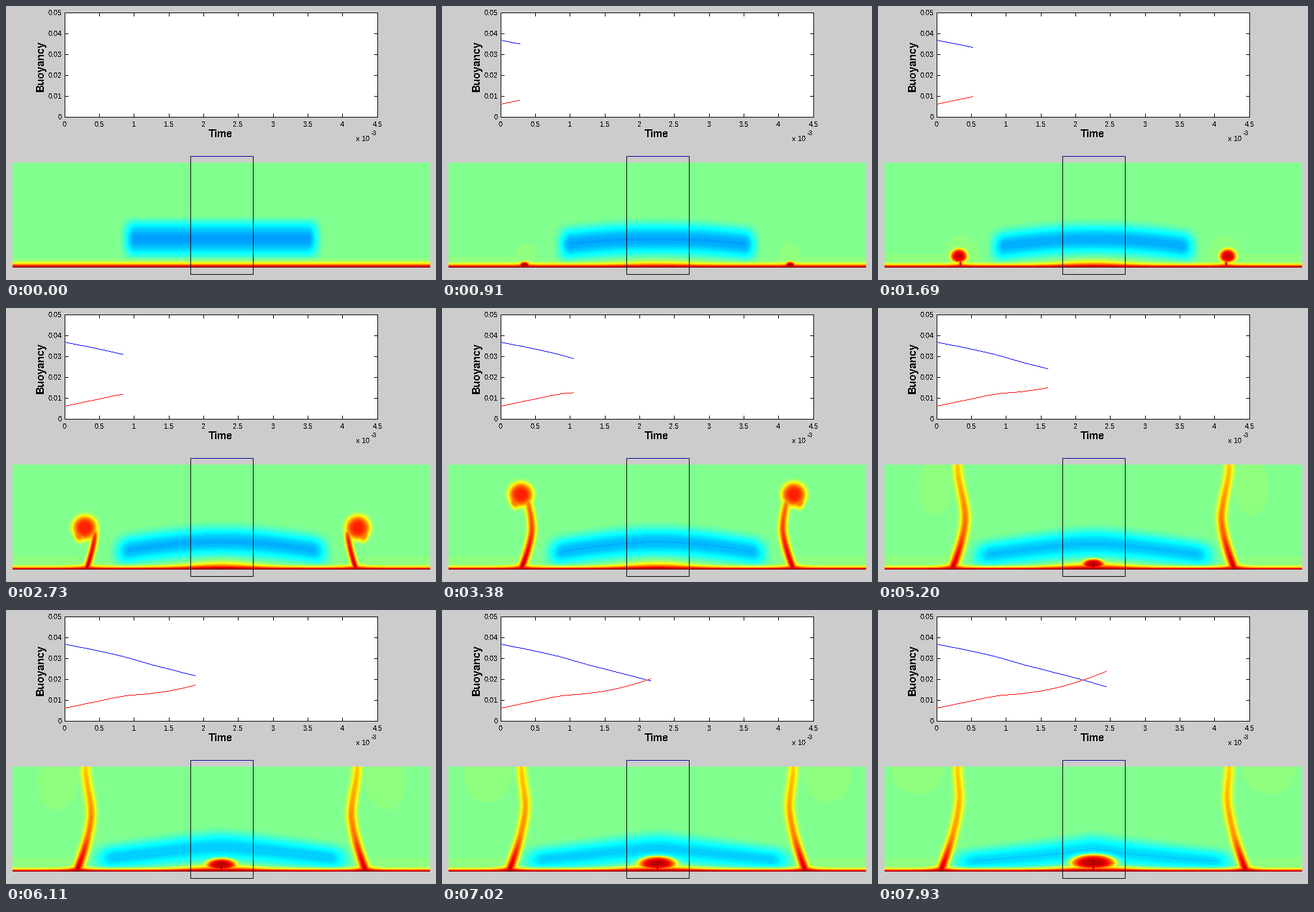
A matplotlib script for the animation above (8 s loop, 660 by 420 pixels).

```python
import numpy as np
import matplotlib.pyplot as plt
from matplotlib.animation import FuncAnimation
from matplotlib.patches import Rectangle

W, H, DPI = 660, 420, 100
INTERVAL, FRAMES, STEP_MS, STEPS = 40, 200, 130, 61
PX = 72 / DPI

plt.rcParams.update({
    "font.family": "Liberation Sans",
    "text.hinting": "native",
    "text.hinting_factor": 1,
})


# ---------------------------------------------------------------- helpers
def ramp(a, b, x):
    return np.clip((x - a) / (b - a), 0, 1)


def ease(a, b, x):
    t = ramp(a, b, x)
    return t * t * (3 - 2 * t)


def window(a, b, c, d, x):
    """Fade in from a to b and out from c to d."""
    return ramp(a, b, x) * (1 - ramp(c, d, x))


def bell(x, width):
    return np.exp(-(x / width) ** 2)


def curve(x, xs, ys):
    """Smooth cubic through a few points."""
    xs, ys = np.asarray(xs, float), np.asarray(ys, float)
    m = np.gradient(ys, xs)
    i = np.clip(np.searchsorted(xs, x, "right") - 1, 0, len(xs) - 2)
    h = xs[i + 1] - xs[i]
    t = (x - xs[i]) / h
    return ((1 + 2 * t) * (1 - t) ** 2 * ys[i] + t * (1 - t) ** 2 * h * m[i]
            + t * t * (3 - 2 * t) * ys[i + 1] + t * t * (t - 1) * h * m[i + 1])


# ---------------------------------------------------------------- field
# Left half of the tank only; the right half is its mirror image.
# Every part takes p, the progress of the run from 0 to 1.
X, Y = np.meshgrid(np.arange(10, 331) + 0.5, np.arange(240, 401) + 0.5)
S = 330.5 - X
D = 401 - Y

u = np.arange(1, 65) / 16
JET = np.stack([np.minimum(u - 1.5, 4.5 - u),
                np.minimum(u - 0.5, 3.5 - u),
                np.minimum(u + 0.5, 2.5625 - u)], axis=1)
JET = np.round(np.clip(JET, 0, 1) * 255).astype(np.uint8)


def blob(cx, cy, rx, ry, amp, below=1.0, power=2):
    """Soft-edged ellipse, optionally flattened on its lower side."""
    low = np.where(Y > cy, ry * below, ry)
    q = ((X - cx) / rx) ** 2 + ((Y - cy) / low) ** 2
    return amp * np.exp(-np.minimum(q, 20) ** power)


def cold_pool(p):
    early = ramp(0, 0.2, p)
    far = np.hypot(S, 14) - 14
    far = np.minimum(far / (135 + 65 * p ** 1.3), 1.1)
    yc = (357 + 10 * p ** 2
          + 20 * np.sqrt(ramp(0, 0.5, p)) * far ** (1.8 - 1.05 * p ** 1.5))
    half = 36 + 2 * early - 2 * p - 8 * p ** 2 * far
    body = np.clip(1 - ((Y - yc) / half) ** 2, 0, 1) ** (1.4 + 1.2 * early)
    end = 172 - 76 * p ** 1.4
    return (3.4 * p - 14) * body * ease(end, end + 26 + 26 * p, X)


def plume_base(p):
    return 128 - 31 * p ** 2


def stem(p, head_y):
    """Rises from the base to a bulge, then leans back to the ceiling."""
    top, base = 122, plume_base(p)
    bulge_y = 350 - 62 * p ** 2
    bulge = 126 + 12 * ramp(0.2, 0.36, p) - 13 * ramp(0.5, 1, p)
    axis = (bulge + (base - bulge) * ramp(bulge_y, 398, Y) ** 1.5
            + (top - bulge) * ease(bulge_y, 240, Y))
    amp = np.interp(Y, [240, 345, 398], [13 - 2 * p, 25 - 10 * p, 28])
    shown = 1 / (1 + np.exp(-np.clip((Y - head_y - 4) / 3, -30, 30)))
    return amp * bell(X - axis, 2 + 5.5 * ramp(0.15, 0.5, p)) * shown


def plume(p):
    grown = ramp(0, 0.344, p)
    x = 127 - 6 * ramp(0.1, 0.34, p)
    y = 402 - 65 * (p / 0.344) ** 2.7
    visible = window(0, 0.05, 0.44, 0.5, p)
    head = blob(x, y, 3 + 16 * grown, 1 + 18 * grown,
                (30 - 8 * grown ** 2) * visible, below=0.4 + 0.6 * grown)
    lobe = blob(x - 8, y + 8, 9, 14, 17 * ramp(0.2, 0.34, p) * visible)

    # Strands left at the ceiling once the head has passed.
    depth = Y - 240
    strands = np.maximum(bell(X - 108 - depth * 0.06, 5),
                         bell(X - 132 + depth * 0.12, 4.5))
    strands *= 15 * (1 - ramp(0, 55, depth)) * window(0.43, 0.5, 0.52, 0.65, p)
    return np.maximum.reduce([stem(p, y), head, lobe, strands])


def dome(p):
    g = ramp(0.42, 1, p)
    cy, ry = 400 - 12 * g ** 0.6, 0.1 + 13 * g ** 0.5
    on = ramp(0, 0.1, g)
    cap = blob(330.5, cy, 0.1 + 34 * g ** 0.75, ry, 28 * on, below=0.7)
    stalk = 32 * on * bell(S, 1.8) * (Y > cy - 0.5 * ry)
    return np.maximum(cap, stalk)


def haze(p):
    late = ramp(0.5, 1, p)
    floor = 1.2 * ramp(0, 0.15, p) * bell(D, 22) * (1 - ease(105, 140, X))
    halo = blob(128, 380, 24, 26, 2 * window(0.06, 0.2, 0.2, 0.3, p), power=1)
    patch = blob(100 - 40 * late, 290 - 50 * late, 20 + 26 * late, 48,
                 ramp(0.36, 0.5, p))
    return np.maximum.reduce([floor, halo, patch])


def hot_floor(p):
    layer = (3.6 + 2 * np.exp(-5 * p)
             + (4.5 * ramp(0, 0.3, p) - 1.2 * p) * bell(S, 58)
             + 6 * ramp(0, 0.6, p) * np.exp(-np.abs(X - plume_base(p)) / 9))
    return 32 * np.exp(-(D / layer) ** 1.5)


def field(p):
    hot = np.maximum.reduce([hot_floor(p), plume(p), dome(p), haze(p)])
    heat = hot + cold_pool(p) * (1 - ramp(0, 14, hot))
    level = np.clip(31 + np.round(heat), 0, 63).astype(int)
    return JET[np.hstack([level, level[:, -2::-1]])]


# ---------------------------------------------------------------- stage
fig = plt.figure(figsize=(W / DPI, H / DPI), dpi=DPI, facecolor="#cccccc")
ax = fig.add_axes([0, 0, 1, 1])
ax.axis("off")


def line(xs, ys, color="black", z=3, cap="projecting"):
    """One-pixel line through pixel centres."""
    return ax.plot(np.add(xs, 0.5), np.add(ys, 0.5), color=color, lw=PX,
                   snap=False, solid_capstyle=cap, solid_joinstyle="miter",
                   zorder=z)[0]


def label(x, y, text, px=11, ha="center", **kw):
    ax.text(x, y, text, fontsize=px * PX, ha=ha, va="baseline",
            rotation_mode="anchor", antialiased=False, **kw)


image = ax.imshow(field(0), extent=(10, 651, 401, 240),
                  interpolation="nearest", aspect="auto", zorder=1)
ax.set(xlim=(0, W), ylim=(H, 0))

ax.add_patch(Rectangle((90, 10), 480, 160, fc="white", ec="none", zorder=1))
line([90, 570, 570, 90, 90], [10, 10, 170, 170, 10])
for n in range(10):
    x = 90 + int(n * 480 / 9)
    line([x, x], [170, 165])
    line([x, x], [10, 15])
    label(x, 185, f"{n / 2:g}")
for n in range(6):
    y = 170 - 32 * n
    line([90, 95], [y, y])
    line([570, 565], [y, y])
    label(86, y + 4, f"{n / 100:g}", ha="right")
label(329, 201, "Time", 17, weight="bold")
label(58, 92, "Buoyancy", 17, weight="bold", rotation=90)
label(537, 207, "x 10", ha="left")
label(561, 198, "-3", 9, ha="left")

line([283, 283, 379, 379], [230, 411, 411, 230])
line([283, 379], [230, 230], "#00009f")

TRACE_X = [90, 145, 180, 222, 261, 320, 351]
TRACES = [
    (line([], [], "#0000ff", 4, "butt"), [52, 63, 71, 83, 93, 108.5, 117.5]),
    (line([], [], "#ff0000", 4, "butt"), [150, 138.5, 131.5, 127.5, 121.5, 105, 93]),
]


def update(i):
    k = (i * INTERVAL + INTERVAL - 1) // STEP_MS
    xs = np.arange(90, 91 + int(4.27 * k))
    gap = np.full(len(xs), np.nan)
    for trace, points in TRACES:
        # One crisp dash per pixel column.
        ys = np.round(curve(xs, TRACE_X, points)) + 0.5
        trace.set_data(np.stack([xs, xs + 1, gap], 1).ravel(),
                       np.stack([ys, ys, gap], 1).ravel())
    image.set_data(field(k / STEPS))
    return image, *(trace for trace, _ in TRACES)


anim = FuncAnimation(fig, update, frames=FRAMES, interval=INTERVAL,
                     repeat=True, repeat_delay=0, blit=False)
plt.show()
```
